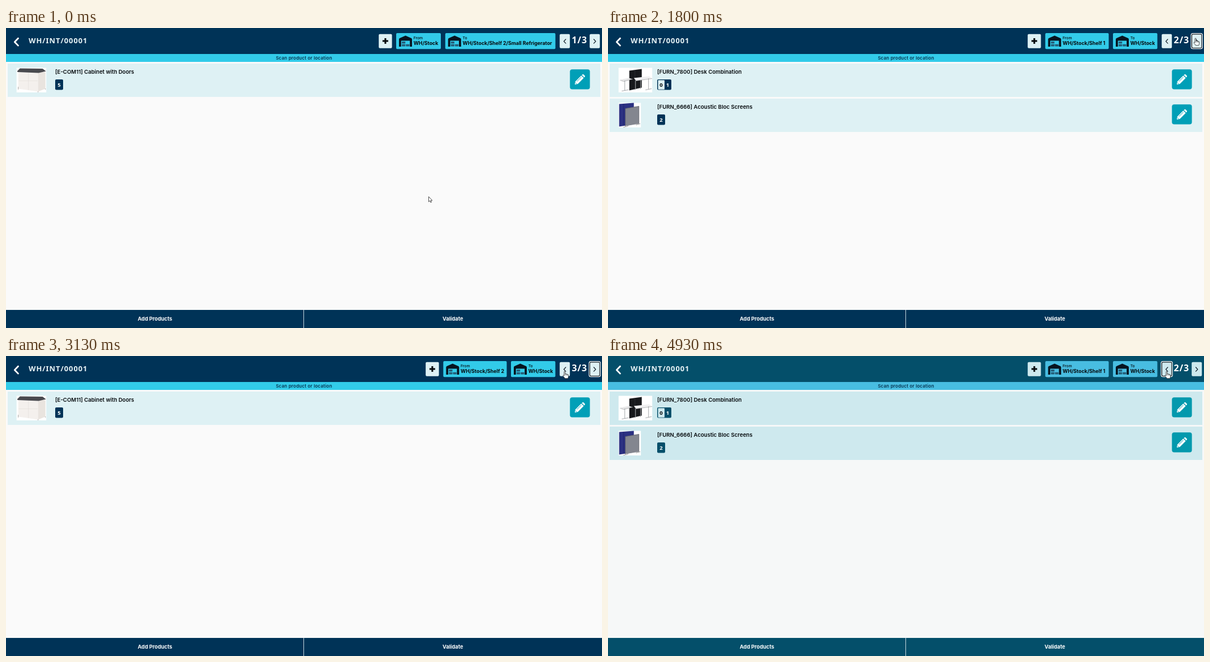
An HTML page that plays this animation: 1054 by 531 pixels, repeating every 5670 ms.

```html
<!DOCTYPE html>
<html lang="en">
<head>
<meta charset="utf-8">
<title>Internal transfer</title>
<style>
html, body { margin: 0; width: 100%; height: 100%; overflow: hidden; background: #fafafa; }
svg {
  display: block; width: 1054px; height: 531px;
  --head: #003357; --sky: #32cbe9; --row: #def1f4; --bg: #fafafa; --teal: #009fb7;
  animation: palette 5670ms step-end infinite;
}
text { font-family: Inter, "Open Sans", sans-serif; font-weight: 600; fill: #05090c; }
.noto { font-family: "Noto Sans", "Open Sans", sans-serif; font-weight: 700; }
.b { font-weight: 700; }
.mid { text-anchor: middle; }
.w { fill: #fff; }
.head { fill: var(--head); } .sky { fill: var(--sky); } .row { fill: var(--row); }
.bg { fill: var(--bg); } .teal { fill: var(--teal); } .hot { fill: #f6c6c5; }
.line { fill: none; stroke-linecap: round; stroke-linejoin: round; }

.t { visibility: hidden; animation: 5670ms step-end infinite; }
#headA, #pageA { animation-name: first; }
#headB, #pageB { animation-name: second; }
#headC { animation-name: third; }
#pageC { animation-name: pageC; }
#pageD { animation-name: pageD; }
#pageE { animation-name: pageE; }
#bar { animation-name: bar; }
#load { animation-name: load; }
#ringR { animation-name: ringR; }
#ringL { animation-name: ringL; }
#arrow { animation-name: arrow; }
#hand { animation-name: hand; }
#cursor { animation: move 5670ms ease-in-out infinite; }

@keyframes palette {
  0% { --head: #003357; --sky: #32cbe9; --row: #def1f4; --bg: #fafafa; --teal: #009fb7; }
  61.199%, 100% { --head: #044f6a; --sky: #48bde1; --row: #cee9ee; --bg: #f6f8f8; --teal: #0499ad; }
}
@keyframes first { 0% { visibility: visible } 18.871%, 100% { visibility: hidden } }
@keyframes second {
  0% { visibility: hidden } 18.871% { visibility: visible }
  32.981% { visibility: hidden } 83.422%, 100% { visibility: visible }
}
@keyframes third { 0% { visibility: hidden } 32.981% { visibility: visible } 83.422%, 100% { visibility: hidden } }
@keyframes pageC { 0% { visibility: hidden } 32.981% { visibility: visible } 61.199%, 100% { visibility: hidden } }
@keyframes pageD { 0% { visibility: hidden } 61.199% { visibility: visible } 77.601%, 100% { visibility: hidden } }
@keyframes pageE { 0% { visibility: hidden } 77.601% { visibility: visible } 83.422%, 100% { visibility: hidden } }
@keyframes bar { 0% { visibility: hidden } 61.199% { visibility: visible } 83.422%, 100% { visibility: hidden } }
@keyframes load {
  0% { visibility: hidden } 58.73% { visibility: visible } 64.727% { visibility: hidden }
  75.309% { visibility: visible } 79.894%, 100% { visibility: hidden }
}
@keyframes ringR { 0% { visibility: hidden } 14.109% { visibility: visible } 81.129%, 100% { visibility: hidden } }
@keyframes ringL { 0% { visibility: hidden } 81.129%, 100% { visibility: visible } }
@keyframes arrow {
  0% { visibility: visible } 9% { visibility: hidden }
  42.3% { visibility: visible } 46.8%, 100% { visibility: hidden }
}
@keyframes hand {
  0% { visibility: hidden } 9% { visibility: visible }
  42.3% { visibility: hidden } 46.8%, 100% { visibility: visible }
}
@keyframes move {
  0%, 1.235% { transform: translate(747px, 298px) }
  10.582%, 40.035% { transform: translate(1039px, 18px) }
  49.383%, 100% { transform: translate(988px, 27px) }
}
</style>
</head>
<body>
<svg id="stage" viewBox="0 0 1054 531"></svg>
<script>
const rect = (x, y, w, h, cls, r = 0, extra = '') =>
  `<rect x="${x}" y="${y}" width="${w}" height="${h}" rx="${r}" class="${cls}" ${extra}/>`;
const text = (x, y, size, str, cls = '', extra = '') =>
  `<text x="${x}" y="${y}" font-size="${size}" class="${cls}" ${extra}>${str}</text>`;
const poly = (points, fill) => `<polygon points="${points}" fill="${fill}"/>`;
const at = (x, y, body) => `<g transform="translate(${x} ${y})">${body}</g>`;
const timed = (id, body) => `<g id="${id}" class="t">${body}</g>`;
const line = (d, color, width) => `<path d="${d}" class="line" stroke="${color}" stroke-width="${width}"/>`;

// Product thumbnails, drawn from the top left corner
const thumbs = {
  cabinet: rect(0, 0, 52.5, 43.5, 'w')
    + poly('3,8 38,8 38,42 3,37', '#f4f0ed') + poly('38,8 51,7 51,37 38,42', '#e9e4df')
    + poly('1,6 6,1 46,1.5 52,6 39,9 2,7.5', '#494a4f')
    + line('M21 9v30M4 23h33', '#e3dedb', .6) + line('M3 34v4M38 42v1M51 37v1', '#aaa', 1),
  desk: rect(0, 0, 59.5, 43.5, 'w')
    + poly('19,5 41,2 41,35 19,40', '#17191c') + line('M29 4v34', '#303338', .7)
    + poly('3,21 18,18 25,20 8,24', '#e7e7e8') + poly('27,18 54,15 59,19 31,23', '#efeff0')
    + line('M11 23v17M6 41l11-2M30 23v15M53 19v19M48 39l10-2M39 22v15', '#a6a8ab', 1)
    + line('M3 22l6 2 16-4M31 23l28-4', '#8d9093', .6),
  screens: rect(0, 0, 39.5, 43.5, 'w')
    + poly('1,2 27,0 27,38 1,42', '#2b3182') + line('M9 2v38', '#20256b', .8)
    + poly('12,10 36,6 36,37 12,41', '#83868f') + line('M12 41V10l24-4v31', '#5d6068', .8)
    + line('M9 43l8-2M31 39l7-2', '#999', 1)
};

const pencil =
  poly('-9,9 -8,3.7 2.4,-6.7 6.7,-2.4 -3.7,8', '#fff') +
  poly('3.4,-7.7 5,-9 6.2,-9 9,-6.2 9,-5 7.7,-3.4', '#fff') +
  line('M-5 3.4L2.4-4M-7.6 6l1.6 1.6', 'var(--teal)', 1);

const warehouse =
  '<path d="M0 20V7Q0 5.6 1.3 5L11.5.4 21.7 5Q23 5.6 23 7V20H19.2V9.5H3.8V20Z" fill="#071420"/>' +
  [[5, 11], [5, 15.8], [12.2, 15.8]].map(([x, y]) => rect(x, y, 6.2, 3.6, '', .4, 'fill="#245e79"')).join('');

function place(x, w, label, name) {
  return rect(x, 9, w, 28.3, 'sky', 2) + at(x + 5, 13, warehouse)
    + text(x + 30.7, 20, 6.8, label, '', 'style="font-weight:500"')
    + text(x + 30.7, 30, 8.8, name, 'b');
}

function header(plusX, from, to, count) {
  const cx = plusX + 11.7;
  return rect(plusX, 10.7, 23.4, 25, 'row', 2)
    + `<path d="M${cx} 18v10M${cx - 5} 23h10" stroke="#05090c" stroke-width="3"/>`
    + place(...from) + place(...to)
    + text(1014.2, 27, 16, count, 'noto w mid', 'letter-spacing=".9"');
}

function badge(y, qty) {
  const label = (x, str, cls) => text(x, y + 12.5, 9.6, str, 'noto mid ' + cls);
  if (qty !== '0/1') return rect(87, y, 14, 18.5, 'head', 2) + label(94, qty, 'w');
  return rect(87, y, 25, 18.5, 'head', 2) + rect(88.5, y + 1.3, 11.5, 16.4, 'row', 1)
    + label(94, '0', '') + label(105.5, '1', 'w');
}

const products = {
  cabinet: '[E-COM11] Cabinet with Doors',
  desk: '[FURN_7800] Desk Combination',
  screens: '[FURN_6666] Acoustic Bloc Screens'
};

// narrow: leaves room for the scroll bar; tall: selected, with step buttons
function row(y, kind, qty, { narrow, hot, tall } = {}) {
  const w = narrow ? 1038 : 1048, h = tall ? 96 : 59, bx = narrow ? 988 : 997.3;
  const step = (x, str) => rect(x, y + 51, 35.3, 35.3, 'teal', 4)
    + text(x + 17.6, y + 72.7, 10.5, str, 'noto w mid');
  return rect(3, y, w, h, hot ? 'hot' : 'row')
    + (tall ? rect(4, y + 1, w - 2, h - 2, '', 0, 'fill="none" stroke="#43484c" stroke-width="2"') : '')
    + at(18.7, y + 7.5, thumbs[kind])
    + text(87, y + 18, 9.6, products[kind]) + badge(y + 28, qty)
    + rect(bx, y + 10.2, 35.3, 35.3, 'teal', 4) + at(bx + 17.6, y + 28, pencil)
    + (tall ? step(947.4, '-1') + step(988, '+1') : '');
}

const narrow = { narrow: true };
const red = { narrow: true, hot: true };
const selected = { narrow: true, hot: true, tall: true };

const pager = (x, dir) => rect(x, 10.7, 18, 25, 'row', 2)
  + line(`M${x + 9 - 1.7 * dir} 20l${3.4 * dir} 3.6-${0} 0l${-3.4 * dir} 3.6`, '#071420', 1.2);
const ring = x => rect(x + .2, 10.9, 17.6, 24.6, '', 2, 'fill="none" stroke="#05090c" stroke-width="1.2"')
  + rect(x - 1, 9.7, 20, 27, '', 3, 'fill="none" stroke="#fff" stroke-width="1.2"');

const arrow = '<path d="M.5.5V9.6L2.6 7.7 4 10.8 5.4 10.2 4.1 7.2H6.8Z" fill="#fff" stroke="#222" stroke-width=".8"/>';
const hand = '<path d="M-1 7V1.2Q-1 0 0 0T1 1.2V4.8Q2.2 4 3 5.2 4.2 4.5 4.9 5.8 6.6 5.4 6.6 7.2V9.5Q6.6 11 5.6 12.8H.4Q-.6 11-2.8 8.6-3.4 7.3-2.3 7.1-1.6 7-1 8Z" fill="#f4fafb" stroke="#222" stroke-width=".8"/>'
  + line('M1 5v2M3 5.4v1.8M4.9 6v1.4', '#333', .6);

const shelf = n => header(742.2, [773.3, 112.2, 'From', 'WH/Stock/Shelf ' + (n - 1)],
  [893, 78.5, 'To', 'WH/Stock'], n + '/3');

document.getElementById('stage').innerHTML =
  rect(0, 0, 1054, 531, 'bg')
  + rect(0, 0, 1054, 46, 'head') + rect(0, 46, 1054, 14, 'sky')
  + line('M21.5 18.3L15.3 24.7 21.5 31.1', '#fff', 2.8)
  + text(40, 27.4, 13, 'WH/INT/00001', 'noto', 'letter-spacing=".9" style="fill:#e8f3f6"')
  + text(527, 56, 8, 'Scan product or location', 'mid', 'letter-spacing=".2" style="fill:#063350"')
  + timed('headA', header(659.2, [690, 79, 'From', 'WH/Stock'],
      [776.8, 194.8, 'To', 'WH/Stock/Shelf 2/Small Refrigerator'], '1/3'))
  + timed('headB', shelf(2)) + timed('headC', shelf(3))
  + pager(979.2, -1) + pager(1032.2, 1)
  + timed('ringL', ring(979.2)) + timed('ringR', ring(1032.2))
  + timed('pageA', row(63, 'cabinet', 5))
  + timed('pageB', row(63, 'desk', '0/1') + row(125, 'screens', 2))
  + timed('pageC', row(63, 'cabinet', 5))
  + timed('pageD', row(63, 'screens', 1, selected) + row(162.3, 'cabinet', 5, narrow))
  + timed('pageE', row(63, 'cabinet', 1, selected) + row(162.3, 'screens', 1, red)
      + row(224.4, 'cabinet', 5, narrow))
  + timed('bar', rect(1045, 60, 9, 439, '', 0, 'fill="#f0f1f1"')
      + rect(1046, 69, 7, 430, '', 0, 'fill="#bdbebe"') + poly('1047,66.5 1049.5,63.5 1052,66.5', '#a0a3a4'))
  + rect(0, 499, 1054, 32, 'head') + rect(526, 499, 1, 32, '', 0, 'fill="#c9d9df"')
  + text(263.4, 518.4, 9.2, 'Add Products', 'b w mid') + text(790.2, 518.4, 9.2, 'Validate', 'b w mid')
  + timed('load', rect(1013, 517, 41, 14, '', 0, 'fill="#6a5b9b"')
      + text(1033.8, 526.6, 6.8, 'Loading (1)', 'noto w mid'))
  + `<g id="cursor">${timed('arrow', arrow)}${timed('hand', hand)}</g>`;
</script>
</body>
</html>
```
